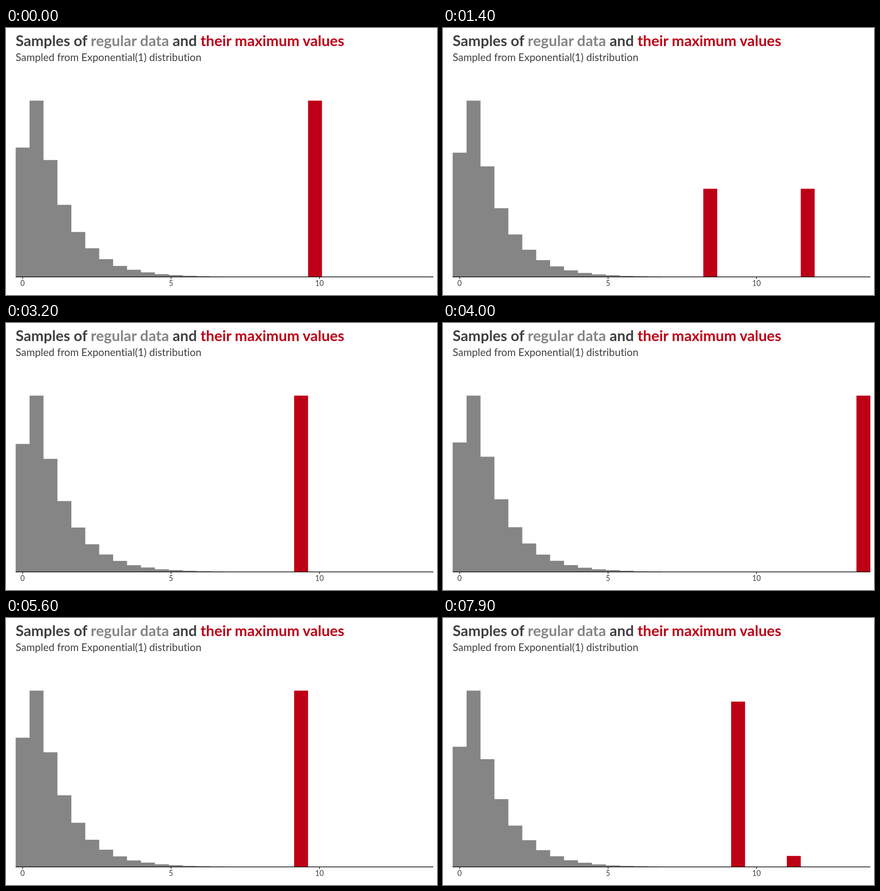
Animation, 950 px wide and 590 px high, one loop 8000 ms. Source, as an HTML page:

```html
<!DOCTYPE html>
<html lang="en">
<head>
<meta charset="utf-8">
<title>Samples and their maximum values</title>
<style>
  html, body { margin: 0; width: 100%; height: 100%; overflow: hidden; background: #fff; }
  svg {
    display: block; width: 950px; height: 590px; fill: #404040;
    font-family: Lato, sans-serif; font-variant-ligatures: none;
  }
  .title { font-size: 32.67px; font-weight: 700; }
  .sub { font-size: 22.87px; }
  .ticks { font-size: 16.33px; text-anchor: middle; }
  .grey { fill: #858585; }
  .red { fill: #be0017; }
  .axis { stroke: #000; stroke-width: 1.74; }
  .marks { stroke: #333; stroke-width: 1.74; }
</style>
</head>
<body>
<svg viewBox="0 0 950 590">
  <text class="title" x="21.3" y="40">Samples of <tspan class="grey">regular data</tspan> and <tspan class="red">their maximum values</tspan></text>
  <text class="sub" x="21.3" y="72.5">Sampled from Exponential(1) distribution</text>
  <path id="regular" class="grey"/>
  <path id="maxima" class="red"/>
  <path class="axis" d="M21.3 550H942"/>
  <path class="marks" d="M36.6 550v4.5M363.8 550v4.5M691 550v4.5"/>
  <g class="ticks">
    <text x="36.6" y="570.4">0</text>
    <text x="363.8" y="570.4">5</text>
    <text x="691" y="570.4">10</text>
  </g>
</svg>
<script>
const LEFT = 21.3, BIN = 30.69, BASE = 550, FULL = 389.5;
const BINS = 15, WIDTH = 0.469; // bin width in data units
const HOLD = 500, STEP = 100, CYCLE = 800, LOOP = 8000;

let seed = 7;
function random() {
  seed = (seed * 16807) % 2147483647;
  return seed / 2147483647;
}

// Exponential(1) mass of a bin; bins are centred on multiples of WIDTH.
const tail = x => Math.exp(-Math.max(0, x));
const mass = i => tail((i - 0.5) * WIDTH) - tail((i + 0.5) * WIDTH);

// Heights relative to the tallest bin, with sampling noise.
function histogram(scale) {
  return Array.from({ length: BINS }, (_, i) => {
    if (i === 1) return FULL;
    const h = FULL * scale * mass(i) / mass(1);
    return Math.max(0, h + (random() - 0.5) * 0.35 * Math.sqrt(h));
  });
}

// Each sample: bin of its maximum, and height of the other bins against the tallest.
const samples = [
  [21, 1.05], [18, 1], [25, 0.99], [20, 1.01], [20, 1.03], [29, 1.04],
  [20, 1.02], [20, 1.03], [21, 1.02], [24, 1.01], [20, 0.97]
].map(([max, scale]) => ({ max, heights: histogram(scale) }));

const regular = document.getElementById("regular");
const maxima = document.getElementById("maxima");
const edge = i => LEFT + BIN * i;
const cubicInOut = k => k < 0.5 ? 4 * k ** 3 : 1 - 4 * (1 - k) ** 3;
const mix = (a, b, k) => a.map((v, i) => v + (b[i] - v) * k);
const bar = (bin, h) => `M${edge(bin)} ${BASE}v${-h}h${BIN}v${h}z`;

function outline(heights) {
  const tops = heights.map((h, i) => `V${BASE - h}H${edge(i + 1)}`);
  return `M${LEFT} ${BASE}${tops.join("")}V${BASE}z`;
}

function draw(time) {
  const t = time % LOOP, i = Math.floor(t / CYCLE), r = t % CYCLE;
  const step = r < HOLD ? 0 : Math.floor((r - HOLD) / STEP) + 1;
  const k = cubicInOut(step / 4);
  const from = samples[i], to = samples[i + 1];
  regular.setAttribute("d", outline(mix(from.heights, to.heights, k)));
  maxima.setAttribute("d", from.max === to.max
    ? bar(from.max, FULL)
    : bar(from.max, FULL * (1 - k)) + bar(to.max, FULL * k));
}

const start = performance.now();
function tick() {
  draw(performance.now() - start);
  requestAnimationFrame(tick);
}
tick();
</script>
</body>
</html>
```
